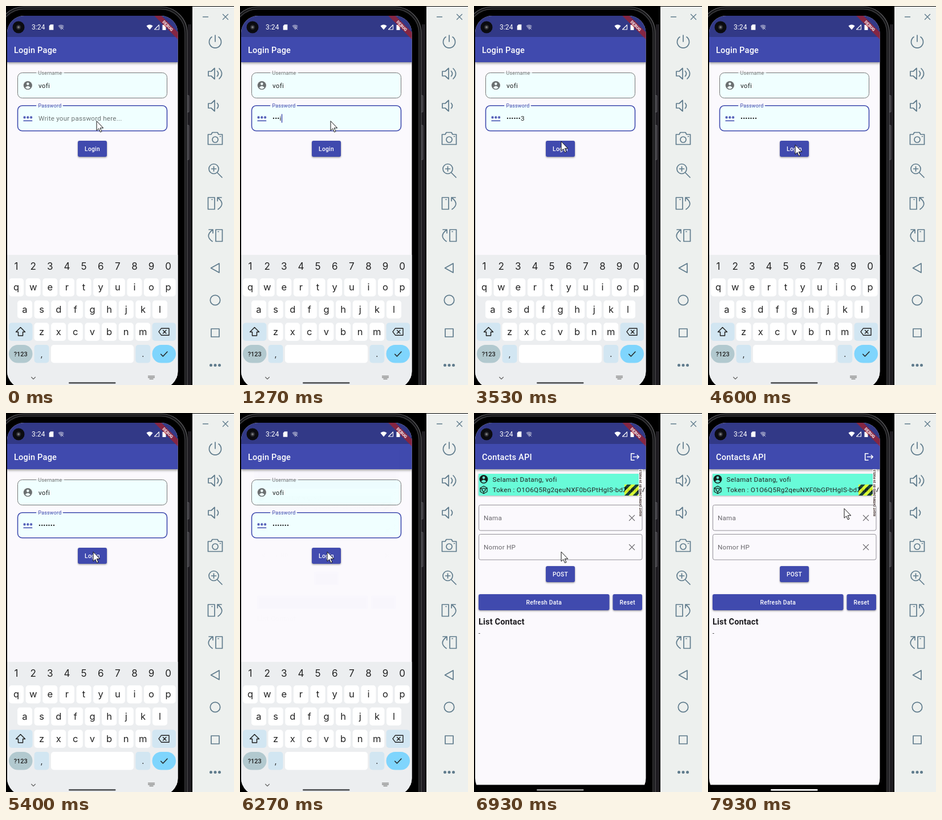
Animation of 400x661 px, one loop 8 s. Source, as an HTML page with a canvas:

```html
<!DOCTYPE html>
<html lang="id">
<head>
<meta charset="utf-8">
<title>Login demo</title>
<style>
html, body { margin: 0; width: 100%; height: 100%; overflow: hidden; background: #000; }
canvas { display: block; width: 400px; height: 661px; }
</style>
</head>
<body>
<canvas id="stage"></canvas>
<script>
const W = 400, H = 661, LOOP = 8000;
const INDIGO = '#404aae', STATUS = '#323987', PAPER = '#fbf9fd', SLATE = '#5f7b8c', INK = '#222';
const USER = 'vofi';
const TYPED = [[430, 'v'], [700, 'o'], [930, 'f'], [1170, 'i'], [1900, '1'], [2300, '2'], [2700, '3']];
const POINTER = [[0, 159, 201], [2900, 159, 201], [3400, 153, 236.5], [3800, 153, 236.5],
  [4100, 153, 242.5], [7200, 153, 242.5], [7850, 239, 167]];

const canvas = document.getElementById('stage');
const c = canvas.getContext('2d');
const dpr = window.devicePixelRatio || 1;
canvas.width = W * dpr;
canvas.height = H * dpr;

const clamp = v => Math.max(0, Math.min(1, v));
const smooth = p => p * p * (3 - 2 * p);
const span = (t, start, length) => clamp((t - start) / length);

function box(x, y, w, h, r, fill, stroke, line = 1) {
  c.beginPath();
  c.roundRect(x, y, w, h, r);
  if (fill) { c.fillStyle = fill; c.fill(); }
  if (stroke) { c.strokeStyle = stroke; c.lineWidth = line; c.stroke(); }
}

function rect(x, y, w, h, fill) {
  c.fillStyle = fill;
  c.fillRect(x, y, w, h);
}

function disc(x, y, r, fill) {
  c.beginPath();
  c.arc(x, y, r, 0, 7);
  c.fillStyle = fill;
  c.fill();
}

function text(s, x, y, size, color, { weight = 400, gap = 0, align = 'left', family = 'Roboto' } = {}) {
  c.font = `${weight} ${size}px ${family}, sans-serif`;
  c.letterSpacing = gap + 'px';
  c.textAlign = align;
  c.textBaseline = 'alphabetic';
  c.fillStyle = color;
  c.fillText(s, x, y);
}

function icon(x, y, d, color, line) {
  const path = new Path2D(d);
  c.save();
  c.translate(x, y);
  c.lineCap = c.lineJoin = 'round';
  if (line) {
    c.strokeStyle = color;
    c.lineWidth = line;
    c.stroke(path);
  } else {
    c.fillStyle = color;
    c.fill(path);
  }
  c.restore();
}

function shadowed(blur, dy, draw) {
  c.save();
  c.shadowColor = 'rgba(0,0,0,.4)';
  c.shadowBlur = blur * dpr;
  c.shadowOffsetY = dy * dpr;
  draw();
  c.restore();
}

function button(x, y, w, label) {
  shadowed(3, 1.2, () => box(x, y, w, 28, 3, INDIGO));
  text(label, x + w / 2, y + 17.7, 10.2, '#fff', { weight: 500, gap: .3, align: 'center' });
}

function person(x, y, r, color, back) {
  disc(x, y, r, color);
  disc(x, y - r * .36, r * .3, back);
  icon(x, y, `M${-r * .6} ${r * .5}Q0 ${-r * .25} ${r * .6} ${r * .5}Q0 ${r * 1.15} ${-r * .6} ${r * .5}Z`, back);
}

function appBar(title) {
  rect(2, 17, 300, 632, PAPER);
  shadowed(4, 1.5, () => rect(2, 54, 300, 44, INDIGO));
  rect(2, 17, 300, 37, STATUS);
  text(title, 14, 82, 14.54, '#fff', { weight: 500, gap: .22 });
}

function loginField(y, label, labelWidth, color, line) {
  box(20.5, y, 262, 44, 8, '#f0ffff', color, line);
  rect(53, y - 2, labelWidth, 2, PAPER);
  rect(53, y, labelWidth, 2, '#f0ffff');
  text(label, 56.5, y + 3, 8.8, color, { gap: .25 });
}

function loginPage(t) {
  appBar('Login Page');
  loginField(116.5, 'Username', 49, '#757575', 1);
  person(38.3, 138.5, 7.6, '#6b6f70', '#f0ffff');
  text(USER, 57, 142.5, 11.64, INK, { gap: .23 });
  loginField(173.8, 'Password', 47, INDIGO, 1.6);
  for (const x of [32.5, 38.3, 44.1])
    icon(x, 194.2, 'M-2 0H2M-1-1.8L1 1.8M1-1.8L-1 1.8', INDIGO, 1.1);
  icon(38.3, 200.3, 'M-7.3 0H7.3', INDIGO, 1.5);
  password(t);
  button(126, 235, 51, 'Login');
}

function password(t) {
  const typed = TYPED.filter(k => k[0] <= t);
  if (!typed.length) {
    text('Write your password here...', 57, 199.8, 11.64, '#6c7474', { gap: .23 });
    return;
  }
  const [last, glyph] = typed[typed.length - 1];
  const shown = '•'.repeat(typed.length - 1) + (t - last < 1500 ? glyph : '•');
  text(shown, 57, 199.8, 11.64, INK, { gap: .23 });
  if (Math.floor((t - last) / 500) % 2 === 0)
    rect(57.3 + c.measureText(shown).width, 188.5, 1.4, 15, INDIGO);
}

function contactField(y, hint) {
  box(8.5, y + .5, 286.5, 44.5, 3, null, '#939197');
  text(hint, 17, y + 27, 11.64, '#69676c', { gap: .23 });
  icon(277, y + 23, 'M-4.6-4.6L4.6 4.6M4.6-4.6L-4.6 4.6', '#69676c', 1.3);
}

// Diagonal hazard stripes whose pattern is anchored to the screen corner.
function hazard(x, y, w, h) {
  const period = 14.54;
  c.save();
  c.beginPath();
  c.rect(x, y, w, h);
  c.clip();
  for (let i = 0; i < 64; i++) {
    const left = 19 + (i / 2 - .25) * period - y;
    c.beginPath();
    c.moveTo(left, y);
    c.lineTo(left + period / 2, y);
    c.lineTo(left + period / 2 - h, y + h);
    c.lineTo(left - h, y + h);
    c.fillStyle = i % 2 ? 'rgba(255,255,0,.75)' : 'rgba(0,0,0,.75)';
    c.fill();
  }
  c.restore();
}

function overflowMark() {
  hazard(264, 124.5, 25, 19.5);
  rect(289, 98, 6.5, 83, '#fff');
  c.save();
  c.translate(294.3, 180);
  c.rotate(-Math.PI / 2);
  text('RIGHT OVERFLOWED BY 29 PIXELS', 0, 0, 5.1, '#3a2626', { weight: 700 });
  c.restore();
}

function contactsPage() {
  appBar('Contacts API');
  icon(282.5, 76.5, 'M-1.5-5.8H-6.8V5.8H-1.5M-3 0H6.8M3.8-3L6.8 0L3.8 3', '#fff', 1.6);
  shadowed(3, 1.2, () => rect(8, 106, 281, 38, '#68fbd8'));
  person(17, 115.5, 7.4, '#14201d', '#68fbd8');
  icon(17, 134, 'M0-6.5L6-3.2V3.2L0 6.5L-6 3.2V-3.2ZM-6-3.2L-2.5-1.4M6-3.2L2.5-1.4M0 6.5V3M0-3L2.7-1.5V1.5L0 3L-2.7 1.5V-1.5Z', '#14201d', 1.3);
  text('Selamat Datang, ' + USER, 32.5, 119.5, 11.64, INK, { gap: .33 });
  text('Token : O1O6Q5Rg2qeuNXF0bGPtHgIS-bdZk8mV', 32.5, 137.7, 11.64, INK, { gap: .3 });
  overflowMark();
  contactField(160, 'Nama');
  contactField(211, 'Nomor HP');
  button(126, 267, 51, 'POST');
  button(8, 316, 229.5, 'Refresh Data');
  button(243.5, 316, 51.5, 'Reset');
  text('List Contact', 8, 368.5, 14.54, '#1d1c20', { weight: 700, gap: .15 });
  text('-', 8, 387.5, 10.2, INK);
}

function key(x, y, w, fill, label, size = 16.5) {
  box(x, y, w, 31.5, fill === '#fff' || w < 30 ? 5 : 16, fill);
  if (label) text(label, x + w / 2, y + 21, size, INK, { align: 'center', family: 'Inter' });
}

function keyboard(dy) {
  const pitch = 29.63;
  c.save();
  c.translate(0, dy);
  rect(2, 434, 300, 240, '#eceef0');
  if (!dy)
    [...'1234567890'].forEach((s, i) =>
      text(s, 18 + i * pitch, 460, 17, INK, { align: 'center', family: 'Inter' }));
  [['qwertyuiop', 5, 475], ['asdfghjkl', 20, 513.5], ['zxcvbnm', 49.5, 552.5]].forEach(([row, x, y]) =>
    [...row].forEach((s, i) => key(x + i * pitch, y, 26, '#fff', s)));
  for (const x of [5, 256.5]) box(x, 552.5, 41.5, 31.5, 5, '#d2e6f2');
  icon(25.5, 568, 'M0-7.5L8 .5H4V7H-4V.5H-8Z', INK, 1.5);
  icon(277, 568.2, 'M-9 0L-4.5-6H9V6H-4.5ZM-1.5-2.7L4 2.7M4-2.7L-1.5 2.7', INK, 1.4);
  key(5, 591, 41.5, '#b2c9cf');
  text('?123', 25.7, 611, 11, INK, { weight: 500, align: 'center' });
  key(49.5, 591, 26, '#d2e6f2', ',', 14);
  key(79, 591, 145, '#fff');
  key(227.3, 591, 26, '#d2e6f2', '.', 14);
  key(256.5, 591, 41.5, '#7fd5fd');
  icon(277.2, 607, 'M-5.5.2L-1.8 4L5.8-4', INK, 1.5);
  icon(48, 649, 'M-3.5-1.7L0 1.7L3.5-1.7', '#666', 1.2);
  icon(255, 648, 'M-5.5-2.5H5.5M-5.5 0H5.5M-3 2.5H3', '#888', 1.3);
  c.restore();
}

function statusIcons() {
  disc(22, 37, 10.5, '#0b0b10');
  disc(22, 37, 4.2, '#2b2b30');
  disc(22, 37, 2, '#77777c');
  text('3:24', 45, 41.2, 12, '#fff', { gap: .1 });
  icon(79.5, 37, 'M-1.5-4.7H3.8V4.7H-3.8V-2.3Z', '#fff');
  icon(96.5, 37, 'M-5.2-2.5Q0-6.5 5.2-2.5L0 4.2Z', 'rgba(255,255,255,.4)');
  icon(99, 39, 'M-2-2L2 2M2-2L-2 2', 'rgba(255,255,255,.55)', 1);
  icon(252, 37, 'M-5.6-2.3Q0-6.8 5.6-2.3L0 4.6Z', '#fff');
  icon(264.5, 37, 'M4-4V4H-4Z', '#fff', 1.1);
  icon(277.5, 37, 'M-1.2-5H1.2V-4H3V5H-3V-4H-1.2Z', '#fff');
}

function debugRibbon() {
  c.save();
  c.translate(301.5, 17);
  c.rotate(Math.PI / 4);
  rect(-30, 20.4, 60, 8.8, 'rgba(183,28,28,.63)');
  text('DEBUG', 0, 27.4, 7.2, '#f5e6ea', { weight: 800, align: 'center' });
  c.restore();
}

function navBar(t) {
  let pill = '#55575a';
  if (t >= 6660) {
    rect(2, 648.5, 300, 13, '#030303');
    const v = Math.round(70 + 185 * span(t, 6800, 300));
    pill = `rgb(${v},${v},${v})`;
  }
  box(110, 656, 82.5, 2.8, 1.4, pill);
}

function phone() {
  rect(0, 0, 327, H, '#000');
  rect(319, 32, 6.5, H, '#1e1c21');
  box(317, 156, 4, 29, 1, '#39383c', '#69686c', .8);
  box(317, 208, 4, 60, 1, '#39383c', '#69686c', .8);
  box(-15, 1.5, 333, 740, 46, '#161618', '#5d5d60', 1.2);
  box(-11, 5.5, 325, 740, 42, '#000', '#3a3a3d', 1.6);
}

function sidebar() {
  rect(327, 1, 73, H, '#edf0ee');
  const put = (y, d) => icon(367, y, d, SLATE, 1.7);
  icon(350, 19, 'M-4.5 0H4.5', SLATE, 1.4);
  icon(385, 19, 'M-4.5-4.5L4.5 4.5M4.5-4.5L-4.5 4.5', SLATE, 1.4);
  const speaker = 'M-12-4H-7L-1-9.5V9.5L-7 4H-12Z';
  put(62, 'M0-11V0M-6-8A10.5 10.5 0 1 0 6-8');
  put(118, speaker + 'M3.5-4.5Q7.5 0 3.5 4.5M7-9Q16 0 7 9');
  put(174, speaker + 'M3.5-4.5Q7.5 0 3.5 4.5');
  put(231, 'M-12.5-7H-7L-5-10.5H4L6-7H12.5V10.5H-12.5ZM5 2A5 5 0 1 1-5 2A5 5 0 1 1 5 2M8.5-3.5H9.5');
  put(287, 'M6-3A8.5 8.5 0 1 1-11-3A8.5 8.5 0 1 1 6-3M4 4L12 12M-6.5-3H1.5M-2.5-7V1');
  const turn = 'M-12.5-10H-1V10.5H-12.5ZM-6-6.5H-5M4-10H11M4-10V-4M4-10Q19 1 5 10.5';
  put(344, turn);
  c.save();
  c.translate(734, 0);
  c.scale(-1, 1);
  put(400, turn);
  c.restore();
  put(457, 'M-7.5 0L7-8V8Z');
  put(513, 'M8.7 0A8.7 8.7 0 1 1-8.7 0A8.7 8.7 0 1 1 8.7 0');
  put(570, 'M-7-7H7V7H-7Z');
  for (const x of [359.5, 367, 374.5]) disc(x, 626.5, 2.5, SLATE);
}

function pointer(t) {
  let i = POINTER.length - 1;
  while (POINTER[i][0] > t) i--;
  const a = POINTER[i], b = POINTER[i + 1] || a;
  const p = smooth(span(t, a[0], b[0] - a[0] || 1));
  const x = a[1] + (b[1] - a[1]) * p, y = a[2] + (b[2] - a[2]) * p;
  const arrow = 'M0 0V16.2L3.7 12.8L6.4 18.9L8.9 17.8L6.2 11.8H11.3Z';
  icon(x, y, arrow, '#fff');
  icon(x, y, arrow, '#111', 1);
}

function draw(t) {
  c.setTransform(dpr, 0, 0, dpr, 0, 0);
  phone();
  c.save();
  c.beginPath();
  c.roundRect(2, 17, 299.5, 650, 30);
  c.clip();

  const enter = span(t, 6270, 300);
  if (enter < 1) loginPage(t);
  if (enter > 0) {
    const scale = 1 - .15 * (1 - enter) ** 1.45;
    if (enter < 1) rect(2, 17, 300, 650, `rgba(0,0,0,${.6 * span(enter, .2, .2)})`);
    c.save();
    c.globalAlpha = clamp(enter * 2.5);
    c.translate(151.5, 331);
    c.scale(scale, scale);
    c.translate(-151.5, -331);
    contactsPage();
    c.restore();
  }
  const slide = span(t, 6390, 250);
  if (slide < 1) keyboard(227 * smooth(slide));
  navBar(t);
  statusIcons();
  debugRibbon();
  c.restore();
  sidebar();
  pointer(t);
}

const begin = performance.now();
function tick() {
  draw((performance.now() - begin) % LOOP);
  requestAnimationFrame(tick);
}
tick();
</script>
</body>
</html>
```
